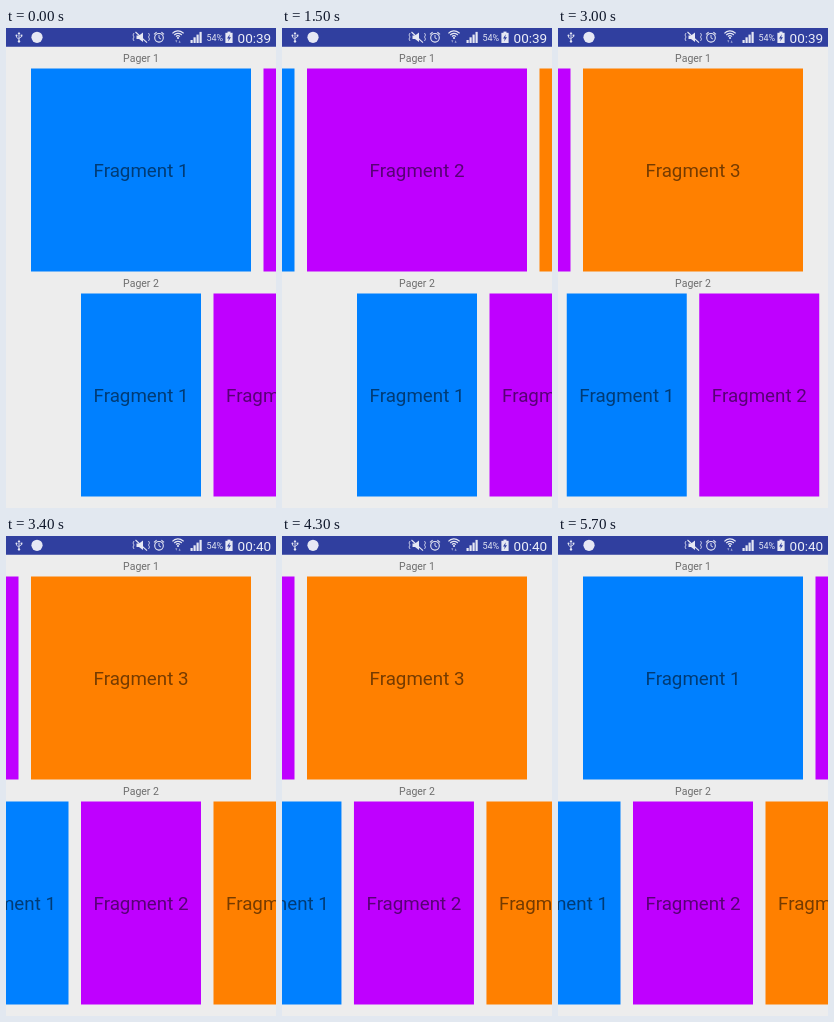
Recreate the animation shown at these times as an HTML page with a canvas. Size 270 px wide and 480 px high, loop 5800 ms.

```html
<!DOCTYPE html>
<html lang="en">
<head>
<meta charset="utf-8">
<title>Two pagers</title>
<style>
html, body { margin: 0; width: 100%; height: 100%; overflow: hidden; background: #ededed; }
canvas { display: block; width: 270px; height: 480px; }
</style>
</head>
<body>
<canvas id="stage"></canvas>
<script>
const W = 270, H = 480, LOOP = 5800, STEP = 100;
const COLORS = ['#0080ff', '#bf00ff', '#ff8000'];
const INK = 'rgba(0,0,0,0.54)';

// Share of the swipe covered at each step: drag, then a decelerating settle.
const SHORT = [0.5, 0.977, 1];
const MEDIUM = [0.25, 0.75, 0.97, 1];
const LONG = [0.2, 0.68, 0.961, 0.985, 0.995, 1];
const LONG_BACK = [0.2, 0.65, 0.94, 0.98, 0.994, 1];

const pagers = [
  { title: 'Pager 1', titleY: 34, top: 40.5, width: 220, swipes: [
    { at: 1200, from: 0, to: 1, steps: MEDIUM },
    { at: 2100, from: 1, to: 2, steps: LONG },
    { at: 4700, from: 2, to: 1, steps: LONG_BACK },
    { at: 5400, from: 1, to: 0, steps: MEDIUM }
  ] },
  { title: 'Pager 2', titleY: 259, top: 265.5, width: 120, swipes: [
    { at: 3000, from: 0, to: 1, steps: SHORT },
    { at: 3700, from: 1, to: 2, steps: MEDIUM },
    { at: 4200, from: 2, to: 1, steps: SHORT }
  ] }
];
const PAGE_H = 203, GAP = 12.5;

const canvas = document.getElementById('stage');
const ctx = canvas.getContext('2d');
const ratio = window.devicePixelRatio || 1;
canvas.width = W * ratio;
canvas.height = H * ratio;
ctx.scale(ratio, ratio);

function text(str, x, y, size, color) {
  ctx.font = size + 'px Roboto, sans-serif';
  ctx.textAlign = 'center';
  ctx.fillStyle = color;
  ctx.fillText(str, x, y);
}

function rect(x, y, w, h, color) {
  ctx.fillStyle = color;
  ctx.fillRect(x, y, w, h);
}

function line(points, width = 1) {
  ctx.lineWidth = width;
  ctx.beginPath();
  points.forEach(([x, y]) => ctx.lineTo(x, y));
  ctx.stroke();
}

function arc(x, y, r, from = 0, to = Math.PI * 2, width = 1) {
  ctx.lineWidth = width;
  ctx.beginPath();
  ctx.arc(x, y, r, from, to);
  ctx.stroke();
}

function dot(x, y, r, color) {
  ctx.fillStyle = color;
  ctx.beginPath();
  ctx.arc(x, y, r, 0, Math.PI * 2);
  ctx.fill();
}

function shape(points, color) {
  ctx.fillStyle = color;
  ctx.beginPath();
  points.forEach(([x, y]) => ctx.lineTo(x, y));
  ctx.fill();
}

function position(swipes, t) {
  let pos = swipes[0].from;
  for (const s of swipes) {
    if (t < s.at) break;
    const i = Math.min(Math.floor((t - s.at) / STEP), s.steps.length - 1);
    pos = s.from + (s.to - s.from) * s.steps[i];
  }
  return pos;
}

function drawPager(p, t) {
  text(p.title, W / 2, p.titleY, 10.5, INK);
  const pos = position(p.swipes, t);
  COLORS.forEach((color, i) => {
    const x = (W - p.width) / 2 + (i - pos) * (p.width + GAP);
    if (x > W || x + p.width < 0) return;
    rect(x, p.top, p.width, PAGE_H, color);
    text('Fragment ' + (i + 1), x + p.width / 2, p.top + 108.8, 18.75, INK);
  });
}

function drawUsb() {
  line([[13, 5], [13, 13]], 0.9);
  line([[10.5, 7.5], [10.5, 9.3], [13, 11.2]], 0.8);
  line([[15.5, 7.5], [15.5, 8.8], [13, 10.4]], 0.8);
  shape([[13, 3.8], [14.4, 6], [11.6, 6]], '#e6e8f4');
  dot(13, 13.4, 1.2, '#e6e8f4');
  dot(10.5, 7.5, 1, '#e6e8f4');
  rect(14.6, 6.6, 1.8, 1.8, '#e6e8f4');
}

function drawMuted() {
  shape([[130.5, 7.6], [133, 7.6], [137, 4.4], [137, 14], [133, 11], [130.5, 11]], '#e6e8f4');
  line([[129.5, 4], [141, 14.6]], 1.1);
  for (const [x, d] of [[128, -1], [142.5, 1]]) {
    line([[x, 5], [x + d, 7], [x, 9], [x + d, 11], [x, 13]], 0.8);
  }
}

function drawAlarm() {
  arc(153, 9.8, 4.3, 0, Math.PI * 2, 1.1);
  line([[153, 7], [153, 10], [155, 11]], 0.9);
  line([[148, 6.3], [150.6, 4.1]], 1.1);
  line([[158, 6.3], [155.4, 4.1]], 1.1);
}

function drawWifi() {
  const up = -Math.PI / 2;
  for (const r of [2.6, 5, 7.4]) arc(172, 10.3, r, up - 0.85, up + 0.85, 1.2);
  dot(172, 10, 1.1, '#e6e8f4');
  shape([[169.3, 12.2], [171.3, 12.2], [170.3, 14.8]], '#9ca4d2');
  shape([[172.6, 14.8], [174.6, 14.8], [173.6, 12.2]], '#9ca4d2');
}

function drawBattery() {
  rect(221.5, 3.6, 3, 1.4, '#e6e8f4');
  rect(219.4, 4.8, 7.2, 10.2, '#e6e8f4');
  shape([[223.8, 6.2], [221, 10.4], [222.8, 10.4], [222.1, 13.6], [225, 9.2], [223.2, 9.2]], '#303f9f');
}

function drawStatus(t) {
  rect(0, 0, W, 18.75, '#303f9f');
  ctx.strokeStyle = '#e6e8f4';
  drawUsb();
  dot(31, 9.3, 5.6, '#e6e8f4');
  drawMuted();
  drawAlarm();
  drawWifi();
  for (let i = 0; i < 4; i++) {
    const h = 3 + i * 2.7;
    rect(184.5 + i * 3, 15 - h, 2.2, h, '#e6e8f4');
  }
  text('54%', 208.8, 13.4, 9, '#dfe2f1');
  drawBattery();
  text(t < 3400 ? '00:39' : '00:40', 248.4, 14.8, 13.5, '#eceef8');
}

function draw(now) {
  const t = now % LOOP;
  rect(0, 0, W, H, '#ededed');
  pagers.forEach(p => drawPager(p, t));
  drawStatus(t);
}

const start = performance.now();
function tick() {
  draw(performance.now() - start);
  requestAnimationFrame(tick);
}
tick();
</script>
</body>
</html>
```
